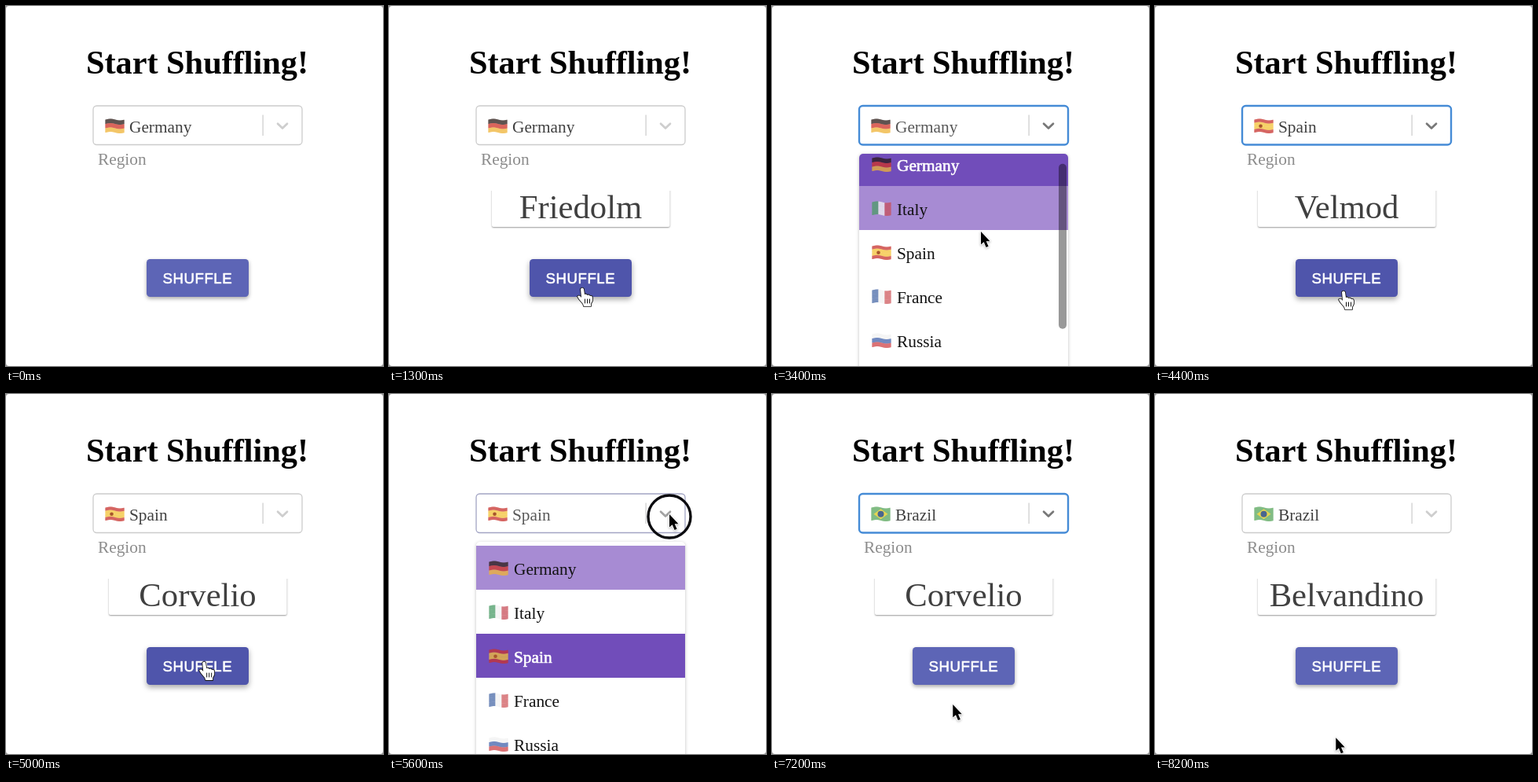
Recreate the animation shown at these times as an HTML page with a canvas. Size 480x458 px, loop 8300 ms.

```html
<!DOCTYPE html>
<html lang="en">
<head>
<meta charset="utf-8">
<title>Start Shuffling!</title>
<style>
  html, body { margin: 0; width: 100%; height: 100%; overflow: hidden; background: #fff; }
  canvas { display: block; }
</style>
</head>
<body>
<canvas id="stage" width="480" height="458"></canvas>
<script>
const ctx = document.getElementById('stage').getContext('2d');
const LOOP = 8300, STEP = 100, TRAVEL = 500, PRESS = 100, ROW = 56;
const SERIF = '"Liberation Serif", "Times New Roman", serif';
const SANS = '"Liberation Sans", Arial, sans-serif';
const BODY = `21.33px ${SERIF}`;

const select = { x: 111, y: 127, w: 266, h: 49.5 };
const button = { x: 179, y: 322, w: 130, h: 48 };
const menu = { x: 111, y: 188, w: 266, h: 390 };

const countries = [
  { name: 'Germany', stripes: ['#2a1a17', '#cf3226', '#f0b436'] },
  { name: 'Italy', stripes: ['#4a9c66', '#f1f1f1', '#c8505a'], vertical: true },
  { name: 'Spain', stripes: ['#c8332f', '#f3c136', '#f3c136', '#c8332f'], disc: '#a8562c' },
  { name: 'France', stripes: ['#4a6aa8', '#f1f1f1', '#d05a5f'], vertical: true },
  { name: 'Russia', stripes: ['#f1f1f1', '#4263ac', '#cf4448'] },
  { name: 'Bangladesh', stripes: ['#3a7f62'], disc: '#d0484a' },
  { name: 'Brazil', stripes: ['#59a65c'], diamond: '#e6d552', disc: '#4a668f' }
];
const picks = [0, 2, 6];
const names = ['', 'Friedolm', 'Velmod', 'Corvelio', 'Belvandino'];

// Pointer stops: arrival time, position, and what is clicked there.
const stops = [
  [100, 366, 58],
  [600, 246, 364, 'shuffle'],
  [1300, 246, 360, 'shuffle'],
  [2300, 287, 206],
  [2400, 285, 165, 'open'],
  [3400, 266, 287],
  [3700, 262, 318, 'pick'],
  [4400, 240, 364, 'shuffle'],
  [5400, 357, 153, 'open'],
  [6500, 220, 332],
  [6800, 225, 412, 'pick'],
  [7500, 240, 364, 'shuffle'],
  [8400, 225, 477]
];

const arrow = new Path2D('M0 0V16.5L3.7 13.2 6.6 20 9.6 18.8 6.7 12.2H11.5Z');
const hand = new Path2D('M-2 0Q0-3 2 0L3 7Q5 5.5 6.5 8 8.5 6.5 10 9 12.5 8 13 11V15L11 19V22H2L1 19-4 13-6 9.5Q-4 7-1 11Z');
const fingers = new Path2D('M3.5 13v5m3-5v5m3-5v5');

const ease = u => {
  u = Math.min(1, Math.max(0, u));
  return u * u * (3 - 2 * u);
};
const inside = ([x, y], r) => x >= r.x && x <= r.x + r.w && y >= r.y && y <= r.y + r.h;
const mix = (from, to, u) => `rgb(${from.map((v, i) => Math.round(v + (to[i] - v) * u))})`;

function pointerAt(t) {
  const next = Math.max(1, stops.findIndex(s => s[0] > t));
  const [from, x0, y0] = stops[next - 1], [to, x1, y1] = stops[next];
  const u = ease(1 - (to - t) / Math.min(TRAVEL, to - from));
  return [x0 + (x1 - x0) * u, y0 + (y1 - y0) * u];
}

// A press shows its ring at once and takes effect one step later.
function stateAt(t) {
  const s = { picked: 0, shuffles: 0, openedAt: 0, open: false, focused: false, ring: false };
  for (const [arrival, , , action] of stops) {
    const age = t - arrival - PRESS;
    if (!action || age < 0) continue;
    if (age < 2 * PRESS) s.ring = true;
    if (action === 'shuffle') s.focused = false;
    if (age < PRESS) continue;
    if (action === 'shuffle') s.shuffles++;
    if (action === 'pick') { s.picked++; s.open = false; }
    if (action === 'open') { s.open = s.focused = true; s.openedAt = t - age + PRESS; }
  }
  return s;
}

function box({ x, y, w, h }, r) {
  ctx.beginPath();
  ctx.roundRect(x, y, w, h, r);
}

function shadow(alpha, blur, dy) {
  ctx.shadowColor = `rgba(0,0,0,${alpha})`;
  ctx.shadowBlur = blur;
  ctx.shadowOffsetY = dy;
}

function text(str, x, y, font, color, { align = 'left', weight = 0 } = {}) {
  ctx.font = font;
  ctx.fillStyle = ctx.strokeStyle = color;
  ctx.textAlign = align;
  ctx.fillText(str, x, y);
  if (weight) {
    ctx.lineWidth = weight;
    ctx.strokeText(str, x, y);
  }
}

function flag({ stripes, vertical, diamond, disc }, x, y) {
  const w = 24, h = 16.5, n = stripes.length, plain = n === 1;
  ctx.save();
  ctx.translate(x, y);
  for (let col = 0; col < w; col++) {
    const dy = -Math.sin(col / w * Math.PI * 2);
    for (let i = 0; i < n; i++) {
      ctx.fillStyle = vertical ? stripes[Math.floor(col / w * n)] : stripes[i];
      ctx.fillRect(col, dy + i * h / n, 1, h / n);
    }
  }
  ctx.translate(plain ? w / 2 : w / 3, h / 2);
  if (diamond) {
    ctx.fillStyle = diamond;
    ctx.fill(new Path2D('M-9 0L0-6.5 9 0 0 6.5Z'));
  }
  if (disc) {
    ctx.fillStyle = disc;
    ctx.beginPath();
    ctx.arc(0, 0, plain ? 4 : 2.3, 0, 7);
    ctx.fill();
  }
  ctx.restore();
}

function drawSelect(country, focus, hovered, open) {
  ctx.strokeStyle = focus === 1 ? '#458bd6' : focus ? '#a3a5c4' : hovered ? '#b3b3b3' : '#ccc';
  ctx.lineWidth = focus === 1 ? 2.4 : 1.3;
  box(select, 4.5);
  ctx.stroke();
  flag(country, 126.5, 144.5);
  text(country.name, 157, 160.5, BODY, open ? '#585858' : '#404040');
  ctx.fillStyle = '#ccc';
  ctx.fillRect(326.5, 138.5, 1.2, 26.5);
  ctx.strokeStyle = mix([206, 206, 206], [120, 120, 120], focus);
  ctx.lineWidth = 2.7;
  ctx.lineCap = ctx.lineJoin = 'round';
  ctx.stroke(new Path2D('M346 149.7l6 5.8 6-5.8'));
}

function drawName(name) {
  ctx.save();
  ctx.beginPath();
  ctx.rect(120, 235, 250, 60);
  ctx.clip();
  shadow(0.4, 2, 1);
  ctx.fillStyle = '#fff';
  box({ x: 131, y: 215, w: 226.5, h: 66 }, 2);
  ctx.fill();
  ctx.restore();
  text(name, 244, 270.3, `42.67px ${SERIF}`, '#404040', { align: 'center' });
}

function drawButton(hover) {
  ctx.save();
  shadow(0.35, 5 + 2 * hover, 2.3 + hover);
  ctx.fillStyle = mix([93, 101, 182], [79, 85, 171], hover);
  box(button, 4.5);
  ctx.fill();
  ctx.restore();
  ctx.letterSpacing = '0.53px';
  text('SHUFFLE', 199.5, 353, `18.67px ${SANS}`, '#fff', { weight: 0.6 });
  ctx.letterSpacing = '0px';
}

function drawMenu(selected, at, age) {
  const scroll = (selected ? 136 : 20) * ease((age - 450) / 350);
  const first = 193 - scroll;
  const hovered = inside(at, menu) ? Math.max(0, Math.floor((at[1] - 4 - first) / ROW)) : 0;
  ctx.save();
  shadow(0.25, 4, 1);
  ctx.fillStyle = '#fff';
  box(menu, 5);
  ctx.fill();
  shadow(0, 0, 0);
  ctx.clip();
  countries.forEach((country, i) => {
    const top = first + i * ROW, chosen = i === selected;
    if (chosen || i === hovered) {
      ctx.fillStyle = chosen ? '#714dba' : '#a78bd3';
      ctx.fillRect(menu.x, top, menu.w, ROW);
    }
    flag(country, 127.5, top + 20.5);
    text(country.name, 159, top + 36.5, BODY, chosen ? '#fff' : '#111', { weight: chosen ? 0.6 : 0 });
  });
  if (scroll > 0) {
    ctx.fillStyle = 'rgba(0,0,0,.4)';
    box({ x: 365, y: 190 + 0.54 * scroll, w: 10, h: 210 }, 5);
    ctx.fill();
  }
  ctx.restore();
}

function drawPointer([x, y], isHand) {
  ctx.save();
  ctx.translate(x, y);
  ctx.lineJoin = 'round';
  ctx.strokeStyle = isHand ? '#111' : '#fff';
  ctx.fillStyle = isHand ? '#fff' : '#000';
  ctx.lineWidth = 1.7;
  if (!isHand) shadow(0.3, 3, 1);
  ctx.stroke(isHand ? hand : arrow);
  shadow(0, 0, 0);
  ctx.fill(isHand ? hand : arrow);
  if (isHand) {
    ctx.lineWidth = 1;
    ctx.stroke(fingers);
  }
  ctx.restore();
}

function drawRing([x, y]) {
  ctx.strokeStyle = '#0b0b0f';
  ctx.lineWidth = 3.4;
  ctx.beginPath();
  ctx.arc(x, y + 3, 27, 0, 7);
  ctx.stroke();
}

function draw(t) {
  const state = stateAt(t), at = pointerAt(t), visible = t >= stops[0][0];
  const overButton = time => inside(pointerAt(time), button);
  const hover = [0, 100, 200].filter(lag => overButton(t - lag)).length / 3;
  const age = t - state.openedAt;
  const focus = state.focused ? Math.min(1, 0.5 + age / 200) : 0;
  const region = picks[state.picked];

  ctx.fillStyle = '#999';
  ctx.fillRect(0, 0, 480, 458);
  ctx.fillStyle = '#fff';
  box({ x: 0, y: 0, w: 480, h: 458 }, 4);
  ctx.fill();

  text('Start Shuffling!', 243.5, 86.3, `bold 42.3px ${SERIF}`, '#000', { align: 'center' });
  text('Region', 117, 202, BODY, '#8c8c8c');
  drawSelect(countries[region], focus, visible && inside(at, select), state.open);
  if (state.shuffles) drawName(names[state.shuffles]);
  drawButton(hover);
  if (state.open) drawMenu(region, at, age);
  if (state.ring) drawRing(at);
  if (visible) drawPointer(at, !state.open && overButton(t));
}

const start = performance.now();
function tick(now) {
  const t = Math.max(0, now - start) % LOOP;
  draw(Math.floor(t / STEP) * STEP);
  requestAnimationFrame(tick);
}
draw(0);
requestAnimationFrame(tick);
</script>
</body>
</html>
```
